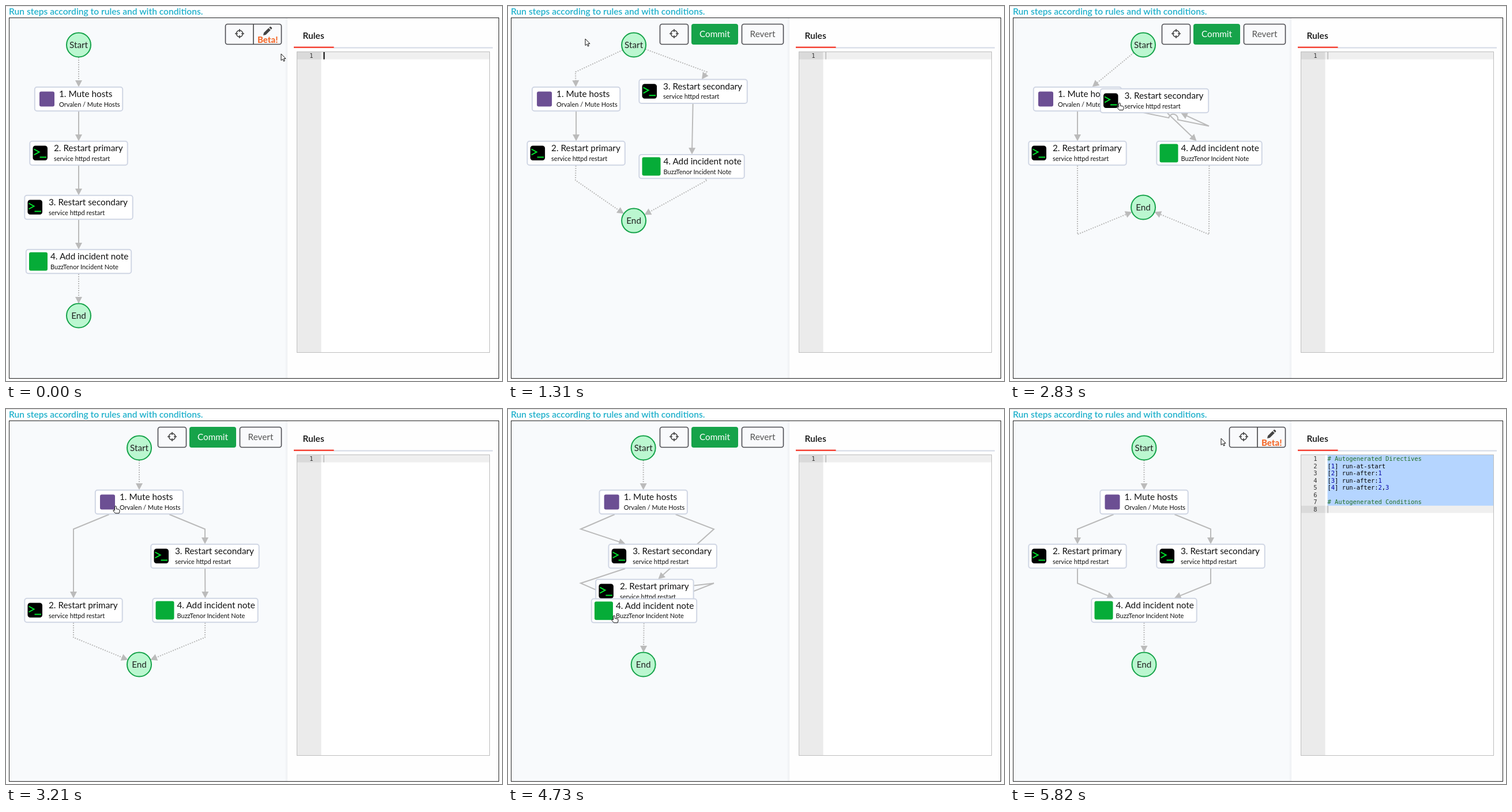
An HTML page for the animation above (6.1 s loop, 860 px wide and 651 px high).

```html
<!DOCTYPE html>
<html lang="en">
<head>
<meta charset="utf-8">
<title>Run steps by rules</title>
<style>
  html, body { margin: 0; width: 100%; height: 100%; overflow: hidden; background: #fff; }
  svg { display: block; width: 860px; height: 651px; font: 15.3px Lato, sans-serif; }
  .semi { font-weight: 600; }
  .sub { font-size: 11px; }
  .code { font: 10.45px "DejaVu Sans Mono", monospace; white-space: pre; }
  .mid { text-anchor: middle; }
  .end { text-anchor: end; }
  .box { fill: #fff; stroke: #d0d6e4; stroke-width: 2; }
  .picked .box { stroke: #12afcd; }
  .ring { fill: #bbf7d0; stroke: #16a34a; stroke-width: 2; }
  .btn { fill: #f9fafc; stroke: #4b4b50; stroke-width: 1.6; }
  .edge { fill: none; stroke: #bbb; stroke-width: 2; }
  .edge.hot { stroke: #12afcd; }
  .dots { stroke-dasharray: 2 2; }
  .tip { fill: #bbb; }
  .line { fill: none; stroke: #444; stroke-width: 1.6; }
  .note { fill: #236e24; }
  .num { fill: #0000a8; }
</style>
</head>
<body>
<svg viewBox="0 0 860 651">
  <defs>
    <linearGradient id="shade">
      <stop offset="0" stop-color="#f8fafc"/>
      <stop offset="1" stop-color="#eef0f3"/>
    </linearGradient>
    <g id="target">
      <circle class="line" r="5.6"/>
      <path class="line" d="M0-8V-3M0 8V3M-8 0H-3M8 0H3"/>
    </g>
  </defs>

  <path d="M0 .5H860" stroke="#ddd"/>
  <text class="semi" style="font-size:15.6px" x="5" y="15" fill="#1fb0cb">Run steps according to rules and with conditions.</text>
  <rect x="6" y="21" width="482" height="625" fill="#f8fafc"/>
  <rect x="483" y="21" width="5" height="625" fill="url(#shade)"/>
  <rect x="488" y="21" width="366" height="625" fill="#fefefe"/>
  <rect x="5.5" y="20.5" width="849" height="626" fill="none" stroke="#222"/>

  <text class="semi" style="font-size:15.6px" x="514.5" y="56.5" fill="#111">Rules</text>
  <path d="M568 72.5H844" stroke="#d3dae6" stroke-width="2"/>
  <path d="M499 71.8H568.5" stroke="#f44336" stroke-width="2.6"/>

  <rect x="504.5" y="79.5" width="334" height="522" fill="#fff" stroke="#bdbdbd"/>
  <rect x="505" y="80" width="41.5" height="521" fill="#ebebeb"/>
  <g id="editor"></g>

  <g id="edges"></g>
  <g id="nodes"></g>

  <g id="viewBar">
    <rect class="btn" x="380.5" y="31.5" width="97" height="35" rx="3.5"/>
    <path class="line" d="M429 31.5V66.5"/>
    <use href="#target" x="405" y="48"/>
    <path fill="#444" d="M446 51L447 46.5 455.3 38.2 458.8 41.7 450.5 50ZM456.2 37.3L457.6 36Q458.6 35.2 459.6 36.2L460.8 37.4Q461.8 38.4 460.9 39.4L459.6 40.8Z"/>
    <text style="font-size:15px;font-weight:800" x="436" y="64" fill="#f4692a">Beta!</text>
  </g>
  <g id="editBar">
    <rect class="btn" x="263.5" y="31.5" width="49" height="35" rx="3.5"/>
    <use href="#target" x="288" y="48"/>
    <rect x="318" y="31" width="81" height="36" rx="4" fill="#16a34a"/>
    <text class="mid" x="358.5" y="54" fill="#fff">Commit</text>
    <rect class="btn" x="405.5" y="31.5" width="72" height="35" rx="3.5"/>
    <text class="mid" x="441.5" y="54" fill="#555">Revert</text>
  </g>

  <g id="mouse">
    <circle id="press" cx="-2" cy="1" r="11" fill="#ffe600" opacity=".75"/>
    <path id="arrow" fill="#fff" stroke="#111" d="M0 0V11.5L2.7 9.1 4.5 13 6.3 12.2 4.6 8.4H8Z"/>
    <path id="hand" fill="#fff" stroke="#111" d="M-1.5 7V1A1.4 1.4 0 0 1 1.3 1V4.5L5.2 5.2Q7 5.7 7 7V9L6 12H-.5L-4 8Q-4.4 6.2-3 6.3Z"/>
  </g>
</svg>
<script>
const LOOP = 6100, STEP = 94.4, LAST = 61, MOVE = 2.85;
const $ = id => document.getElementById(id);
const rowY = r => 67.5 + 94 * r;
const mix = (a, b, k) => a + (b - a) * k;
const within = (n, spans) => spans.some(([a, b]) => n >= a && n <= b);

const terminal = x => `<rect x="${x + 6}" y="-13" width="25.5" height="25.5" rx="4.5"/>
  <path d="M${x + 8}-7L${x + 17}-2 ${x + 8} 3M${x + 18} 7H${x + 29.5}" fill="none" stroke="#00e52e" stroke-width="2"/>`;
const square = (x, size, color) =>
  `<rect x="${x}" y="${-size / 2}" width="${size}" height="${size}" rx="3" fill="${color}"/>`;

const items = {
  S: { r: 21.5, title: 'Start' },
  1: { w: 77, title: '1. Mute hosts', sub: 'Orvalen / Mute Hosts', icon: x => square(x + 9, 26, '#6c4f93') },
  2: { w: 85.5, title: '2. Restart primary', sub: 'service httpd restart', icon: terminal },
  3: { w: 94.5, title: '3. Restart secondary', sub: 'service httpd restart', icon: terminal },
  4: { w: 92, title: '4. Add incident note', sub: 'BuzzTenor Incident Note', icon: x => square(x + 6, 32, '#06ac38') },
  E: { r: 21.5, title: 'End' }
};
const ids = ['S', '1', '2', '3', '4', 'E'];
const H = 21.5;

// Places are [x, row]; links are [from, to, bend x, bend row].
const stages = [
  { at: 0, link: 0,
    place: [[126, 0], [126, 1], [126, 2], [126, 3], [126, 4], [126, 5]],
    links: [['S', '1'], ['1', '2'], ['2', '3'], ['3', '4'], ['4', 'E']] },
  { at: 11.5, link: 11.5, start: { 3: [150, 54] },
    place: [[231, 0], [117, 1], [117, 2], [345, 1], [345.5, 2], [231, 3]],
    links: [['S', '1', 117, .5], ['S', '3', 345, .5], ['1', '2'], ['3', '4'],
      ['2', 'E', 117, 2.5], ['4', 'E', 345, 2.5]] },
  { at: 30, link: 29, start: { 3: [250.5, 164.5] },
    place: [[231, 0], [231, 1], [117, 3], [345, 2], [345.5, 3], [231, 4]],
    links: [['S', '1'], ['1', '2', 117, 1.5], ['1', '3', 345, 1.5], ['3', '4'],
      ['2', 'E', 117, 3.5], ['4', 'E', 345, 3.5]] },
  { at: 49, link: 49, start: { 2: [172, 349.5], 4: [233, 350.5] },
    place: [[241.5, 0], [241.5, 1], [357, 2], [126, 2], [241.5, 3], [241.5, 4]],
    links: [['S', '1'], ['1', '3', 126, 1.5], ['1', '2', 357, 1.5],
      ['3', '4', 126, 2.5], ['2', '4', 357, 2.5], ['4', 'E']] },
  { at: 60, link: 60, snap: true,
    place: [[232.5, 0], [232.5, 1], [117, 2], [348, 2], [232.5, 3], [232.5, 4]],
    links: [['S', '1'], ['1', '2', 117, 1.5], ['1', '3', 348, 1.5],
      ['2', '4', 117, 2.5], ['3', '4', 348, 2.5], ['4', 'E']] }
];

// Tracks are [step, x, y].
const drags = [
  { id: '3', drop: 11.5, end: 11.5, track: [[10, 126, 349.5], [11, 142, 160], [11.5, 150, 54]] },
  { id: '3', drop: 29, end: 30, track: [[22, 345, 161.5], [27, 250.5, 164.5]] },
  { id: '4', drop: 49, end: 49, track: [[43, 345.5, 349.5], [44, 309.5, 349.5], [45, 280, 350], [46, 260, 350], [48, 233, 350.5]] }
];
const mouseTrack = [
  [0, 477, 83], [2, 462, 56], [3, 453, 46], [4, 450, 50], [7, 320, 155], [9, 155, 304],
  [10, 110, 352], [11, 126, 163], [11.5, 134, 57], [14, 134, 57], [19, 283, 168.5], [22, 283, 168.5],
  [27, 190, 168.5], [35, 190, 169], [42, 293, 358], [43, 264, 359], [44, 225, 359.5],
  [45, 208, 359.5], [47, 184, 359], [51, 184, 359], [57, 366, 51]
];
const presses = [[3, 3], [10, 11], [21, 28], [42, 48], [57, 57]];
const hands = [[10, 11], [19, 35], [41, 51]];

function follow(track, n) {
  let a = track[0];
  for (const b of track) {
    if (n < b[0]) {
      const k = Math.max(0, (n - a[0]) / (b[0] - a[0]));
      return [mix(a[1], b[1], k), mix(a[2], b[2], k)];
    }
    a = b;
  }
  return [a[1], a[2]];
}

const home = (stage, i) => [stage.place[i][0], rowY(stage.place[i][1])];

function positions(n, drag) {
  const s = stages.findLastIndex(g => n >= g.at), stage = stages[s];
  const k = s && !stage.snap ? Math.min(1, (n - stage.at) / MOVE) : 1;
  const out = {};
  ids.forEach((id, i) => {
    const to = home(stage, i);
    const from = stage.start?.[id] || (s ? home(stages[s - 1], i) : to);
    out[id] = [mix(from[0], to[0], k), mix(from[1], to[1], k)];
  });
  if (drag) out[drag.id] = follow(drag.track, n);
  return out;
}

// Point where the line from a node's centre to q leaves the node.
function leave(id, p, q) {
  const dx = q[0] - p[0], dy = q[1] - p[1], { r, w } = items[id];
  const k = r ? r / Math.hypot(dx, dy) : Math.min(w / Math.abs(dx), H / Math.abs(dy));
  return [p[0] + dx * Math.min(1, k), p[1] + dy * Math.min(1, k)];
}

function crossing([ax, ay], [bx, by], [cx, cy], [dx, dy]) {
  const ux = bx - ax, uy = by - ay, vx = dx - cx, vy = dy - cy, det = ux * vy - uy * vx;
  if (!det) return 0;
  const t = ((cx - ax) * vy - (cy - ay) * vx) / det;
  const s = ((cx - ax) * uy - (cy - ay) * ux) / det;
  return t > .03 && t < .97 && s > .03 && s < .97 ? t : 0;
}

function drawEdges(n, pos, drag, hot) {
  const stage = stages.findLast(g => n >= g.link);
  const routes = stage.links.map(([a, b, x, r]) => {
    const pts = [pos[a], pos[b]];
    if (r) {
      const held = hot && (a === hot || b === hot);
      const shift = held ? [pos[hot][0] - drag.track[0][1], 5] : [0, 0];
      pts.splice(1, 0, [x + shift[0], rowY(r) + shift[1]]);
    }
    const m = pts.length - 1;
    const first = leave(a, pts[0], pts[1]), last = leave(b, pts[m], pts[m - 1]);
    pts[0] = first;
    pts[m] = last;
    return { a, b, pts };
  });

  $('edges').innerHTML = routes.map(({ a, b, pts }, i) => {
    let d = `M${pts[0]}`, angle = 0;
    for (let j = 1; j < pts.length; j++) {
      const p = pts[j - 1], q = pts[j];
      const dx = q[0] - p[0], dy = q[1] - p[1], len = Math.hypot(dx, dy) || 1;
      const on = l => [p[0] + dx * l / len, p[1] + dy * l / len];
      for (const other of routes.slice(i + 1)) {
        for (let m = 1; m < other.pts.length; m++) {
          const t = crossing(p, q, other.pts[m - 1], other.pts[m]);
          if (t) d += `L${on(t * len - 8)}A8 8 0 0 ${dx > 0 ? 1 : 0} ${on(t * len + 8)}`;
        }
      }
      d += `L${on(j === pts.length - 1 ? Math.max(0, len - 9) : len)}`;
      angle = Math.atan2(dy, dx) * 180 / Math.PI;
    }
    const dots = a === 'S' || b === 'E' ? ' dots' : '';
    const lit = a === hot || b === hot ? ' hot' : '';
    return `<path class="edge${dots}${lit}" d="${d}"/>
      <path class="tip" d="M.5 0L-11-6V6Z" transform="translate(${pts.at(-1)}) rotate(${angle})"/>`;
  }).join('');
}

function nodeMarkup(id) {
  const { r, w, title, sub, icon } = items[id];
  if (r) return `<g id="n${id}"><circle class="ring" r="${r - .5}"/>
    <text class="mid" y="5" fill="#222">${title}</text></g>`;
  const x = -w, tx = x + (icon === terminal ? 42.5 : 43);
  return `<g id="n${id}"><rect class="box" x="${x + .8}" y="${-H + .8}" width="${2 * w - 1.6}" height="${2 * H - 1.6}" rx="4"/>
    ${icon(x)}<text x="${tx}" y="-3.5" fill="#111">${title}</text>
    <text class="sub" x="${tx}" y="13" fill="#111">${sub}</text></g>`;
}

function editorMarkup(filled, focus) {
  const rules = ['# Autogenerated Directives', '[1] run-at-start', '[2] run-after:1',
    '[3] run-after:1', '[4] run-after:2,3', '', '# Autogenerated Conditions', ''];
  const lines = filled ? rules : [''];
  const top = 80 + 12.55 * (lines.length - 1);
  const paint = s => s[0] === '#' ? `<tspan class="note">${s}</tspan>`
    : s.replace(/\d/g, '<tspan class="num">$&</tspan>');
  return `<rect x="505" y="${top}" width="41.5" height="12.6" fill="#dadada"/>
    <rect x="546.5" y="${top}" width="291.5" height="12.6" fill="#efefef"/>
    <rect x="550.5" y="80" width="287.5" height="${top - 80}" fill="#b5d5ff"/>
    <rect x="550.5" y="${top}" width="${focus ? 2 : 1.2}" height="12.6" fill="${focus ? '#000' : '#aaa'}"/>` +
    lines.map((s, i) => {
      const y = 90 + 12.55 * i;
      return `<text class="code end" x="532.5" y="${y}" fill="#333">${i + 1}</text>
        <text class="code" x="550.5" y="${y}">${paint(s)}</text>`;
    }).join('');
}

function draw(n) {
  const drag = drags.find(d => n >= d.track[0][0] && n < d.end);
  const hot = drag && n < drag.drop ? drag.id : null;
  const pos = positions(n, drag);
  for (const id of ids) {
    $('n' + id).setAttribute('transform', `translate(${pos[id]})`);
    $('n' + id).classList.toggle('picked', id === hot);
  }
  drawEdges(n, pos, drag, hot);
  $('editor').innerHTML = editorMarkup(n >= 60, n < 4);

  const editing = n >= 4 && n < 59, hand = within(n, hands);
  const show = (id, on) => $(id).setAttribute('visibility', on ? 'visible' : 'hidden');
  show('editBar', editing);
  show('viewBar', !editing);
  show('hand', hand);
  show('arrow', !hand);
  show('press', within(n, presses));
  $('mouse').setAttribute('transform', `translate(${follow(mouseTrack, n)})`);
}

$('nodes').innerHTML = ids.map(nodeMarkup).join('');
let shown = -1;
const t0 = performance.now();
function tick() {
  const t = (performance.now() - t0) % LOOP;
  const n = Math.min(LAST, Math.floor(t / STEP + .2));
  if (n !== shown) draw(shown = n);
  requestAnimationFrame(tick);
}
tick();
</script>
</body>
</html>
```
